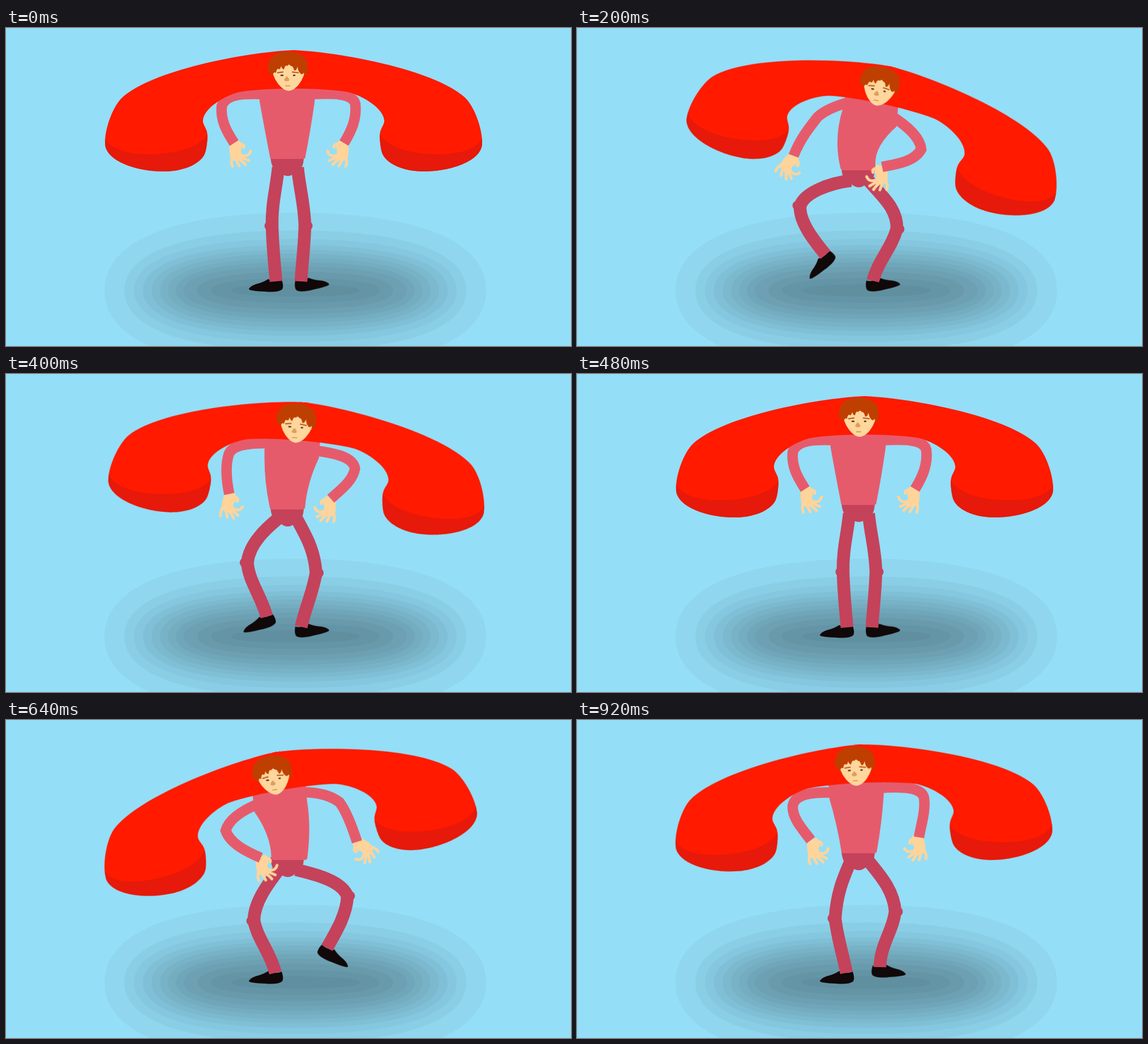
These frames come from a looping animation (998 by 561 pixels, 960 ms). An HTML page without scripts:

```html
<!DOCTYPE html>
<html lang="en">
<head>
<meta charset="utf-8">
<title>Phone carrier dance</title>
<style>
html, body { margin: 0; width: 100%; height: 100%; overflow: hidden; background: #94def7; }
svg { display: block; width: 998px; height: 561px; }

/* --r: rest, --a: sway to the right, --b: sway to the left */
.sway { animation: sway .96s steps(6) infinite; }
.lean { d: var(--r); animation: lean .96s steps(6) infinite; }
.limb { d: var(--r); animation: bend .96s infinite; fill: none; }
.leg  { stroke: #c5425b; stroke-width: 22.5; }
.arm  { stroke: #e65b6c; stroke-width: 18.5; }

@keyframes sway {
  0%, 50%, 100% { transform: none; }
  25% { transform: var(--a); }
  75% { transform: var(--b); }
}
@keyframes lean {
  0%, 50%, 100% { d: var(--r); }
  25% { d: var(--a); }
  75% { d: var(--b); }
}
/* Knees and elbows bend unevenly, so limbs get two poses on the way to the peak */
@keyframes bend {
  0%      { d: var(--r);  animation-timing-function: steps(1); }
  4.166%  { d: var(--a1); animation-timing-function: steps(3); }
  16.66%  { d: var(--a2); animation-timing-function: steps(2); }
  25%     { d: var(--a);  animation-timing-function: steps(2); }
  33.33%  { d: var(--a2); animation-timing-function: steps(3); }
  45.83%  { d: var(--a1); animation-timing-function: steps(1); }
  50%     { d: var(--r);  animation-timing-function: steps(1); }
  54.166% { d: var(--b1); animation-timing-function: steps(3); }
  66.66%  { d: var(--b2); animation-timing-function: steps(2); }
  75%     { d: var(--b);  animation-timing-function: steps(2); }
  83.33%  { d: var(--b2); animation-timing-function: steps(3); }
  95.83%  { d: var(--b1); animation-timing-function: steps(1); }
  100%    { d: var(--r); }
}

#leg-left {
  marker-mid: url(#knee-left);
  --r:  path("M481 246C478 280 469 310 470 349C471 385 474 415 477 447");
  --a1: path("M480 250C466 270 441 300 439 338C442 372 464 396 468 438");
  --a2: path("M482 265C448 276 408 296 401 322C402 352 422 378 446 408");
  --a:  path("M486 273C444 272 396 284 387 306C384 332 410 366 432 392");
  --b1: path("M482 252C470 280 459 305 456 350C460 385 470 415 476 446");
  --b2: path("M482 264C462 290 438 322 438 354C444 386 466 408 476 446");
  --b:  path("M482 275C455 300 426 326 430 358C436 388 468 414 476 446");
}
#leg-right {
  marker-mid: url(#knee-right);
  --r:  path("M515 246C518 280 527 310 528 349C527 385 523 415 521 447");
  --a1: path("M514 252C526 280 537 305 541 350C537 385 527 415 521 446");
  --a2: path("M514 265C534 292 560 316 561 352C552 386 532 408 522 446");
  --a:  path("M514 271C542 300 572 320 569 356C560 390 532 412 523 446");
  --b1: path("M516 250C532 270 560 300 562 338C558 372 536 396 535 436");
  --b2: path("M512 264C546 272 594 284 603 311C602 342 584 372 567 402");
  --b:  path("M508 269C560 268 608 264 617 288C621 318 604 354 588 382");
}
#arm-left {
  --r:  path("M460 117C420 115 388 116 381 138C379 162 388 180 403 203");
  --a1: path("M462 120C424 117 388 118 384 138C381 160 389 184 398 207");
  --a2: path("M478 126C448 130 426 136 413 147C398 166 390 194 387 221");
  --a:  path("M483 136C460 146 446 158 437 167C422 186 398 198 378 230");
  --b1: path("M460 128C416 127 384 130 381 152C380 172 396 190 413 212");
  --b2: path("M450 146C420 158 394 174 388 195C396 218 424 232 450 243");
  --b:  path("M444 158C418 180 398 206 400 229C416 250 448 256 472 261");
}
#arm-right {
  --r:  path("M534 117C576 115 612 114 617 134C620 160 610 182 597 203");
  --a1: path("M534 127C580 127 614 130 617 152C616 172 602 190 586 212");
  --a2: path("M548 149C580 162 612 178 615 197C606 220 574 230 549 236");
  --a:  path("M554 156C580 178 600 206 601 231C586 252 554 250 529 254");
  --b1: path("M534 120C572 117 610 118 613 138C616 160 608 184 604 207");
  --b2: path("M522 127C556 128 574 134 589 145C602 162 612 190 620 215");
  --b:  path("M514 132C536 150 554 160 565 169C582 186 608 198 634 217");
}
#torso {
  fill: #e65b6c;
  --r: path("M447 100L448 130Q457 180 466 226Q466 231 470 231L525 231Q529 231 529 226Q538 180 545 131L547 100Z");
  --a: path("M482 114L474 144Q452 198 465 250Q466 255 470 255L521 255Q527 255 527 250Q520 216 568 183L572 138Z");
  --b: path("M429 136L434 178Q473 214 470 250Q471 255 475 255L529 255Q534 255 534 250Q540 192 525 147L519 112Z");
}
#pelvis { --a: translate(0, 24px); --b: translate(0, 24px); }
#phone {
  transform-origin: 508px 163px;
  --a: translate(24px, 31px) rotate(14.8deg);
  --b: translate(-17px, 23.5px) rotate(-15deg);
}
#head {
  transform-origin: 499px 110px;
  --a: translate(35px, 31px) rotate(13.8deg);
  --b: translate(-32px, 31px) rotate(-13.8deg);
}
#foot-left  { transform-origin: 477px 446px; --a: translate(-46px, -55px) rotate(-48deg); --b: none; }
#foot-right { transform-origin: 521px 446px; --a: none; --b: translate(68px, -66px) rotate(52deg); }
#hand-left {
  transform-origin: 403px 203px;
  --a: translate(-25px, 27px) rotate(54deg);
  --b: translate(70px, 59px) rotate(0deg);
}
#hand-right {
  transform-origin: 597px 203px;
  --a: translate(-70px, 50px) rotate(-9deg);
  --b: translate(36px, 16px) rotate(-88deg);
}
</style>
</head>
<body>
<svg viewBox="0 0 998 561">
  <defs>
    <path id="ring" d="M-1 0C-1-.64-.64-1 0-1S1-.64 1 0 .64 1 0 1-1 .64-1 0"/>
    <path id="shoe" fill="#100809" d="M-14-3Q-3 3 10-2Q14 9 11 15Q3 21-19 19Q-45 18-48 15Q-47 10-36 6Q-23 3-14-3Z"/>
    <g id="hand" stroke="#ffd49b" stroke-width="5" stroke-linecap="round" fill="none">
      <path fill="#ffd49b" stroke="none" d="M-8 3L8-5Q17 2 12 15Q16 24 10 30L-4 31Q-10 18-8 3Z"/>
      <path d="M9 1Q19 2 17 8M10 21Q26 26 29 14M8 24Q20 28 26 31M6 27Q14 31 20 38M2 27Q6 35 9 40M-4 26Q-6 36-3 41"/>
    </g>
    <g id="half-phone">
      <path fill="#ff1a00" d="M509 39H508C420 43 257 75 205 123C189 138 174 178 175 204C176 236 235 254 282 253C318 252 344 238 351 222C355 208 358 190 354 180C350 171 347 167 348 162C350 142 384 120 412 113C440 108 480 107 508 107H509Z"/>
      <path fill="#e6190a" d="M175 194C186 222 245 227 290 220C322 215 345 205 355.500 188C356 205 353 218 351 222C344 238 318 252 282 253C235 254 176 236 175 204Z"/>
    </g>
    <marker id="knee-left" orient="auto" markerUnits="userSpaceOnUse" overflow="visible">
      <circle cy="5" r="8.500" fill="#c5425b"/>
    </marker>
    <marker id="knee-right" orient="auto" markerUnits="userSpaceOnUse" overflow="visible">
      <circle cy="-5" r="8.500" fill="#c5425b"/>
    </marker>
  </defs>

  <rect width="998" height="561" fill="#94def7"/>
  <g transform="translate(511 463)" fill-opacity=".034">
    <use href="#ring" transform="scale(337 137)"/>
    <use href="#ring" transform="scale(302 106)"/>
    <use href="#ring" transform="scale(285 91)"/>
    <use href="#ring" transform="scale(269 80)"/>
    <use href="#ring" transform="scale(254 72)"/>
    <use href="#ring" transform="scale(239 65)"/>
    <use href="#ring" transform="scale(225 57)"/>
    <use href="#ring" transform="scale(211 50)"/>
    <use href="#ring" transform="scale(197 42)"/>
    <use href="#ring" transform="scale(173 33)"/>
    <use href="#ring" transform="scale(149 22)"/>
    <use href="#ring" transform="scale(114 11)"/>
  </g>

  <g id="foot-left" class="sway"><use href="#shoe" transform="translate(477 446)"/></g>
  <g id="foot-right" class="sway"><use href="#shoe" transform="translate(521 446) rotate(-10) scale(-1 1)"/></g>
  <path id="leg-left" class="limb leg"/>
  <path id="leg-right" class="limb leg"/>
  <path id="pelvis" class="sway" fill="#c5425b" d="M467 226H526Q526 240 522 246Q514 248 510 256Q498 266 485 256Q480 248 472 246Q468 240 467 226Z"/>
  <path id="torso" class="lean"/>

  <g id="hand-left" class="sway"><use href="#hand" transform="translate(403 203)"/></g>
  <g id="hand-right" class="sway"><use href="#hand" transform="translate(597 203) scale(-1 1)"/></g>
  <path id="arm-left" class="limb arm"/>
  <path id="arm-right" class="limb arm"/>

  <g id="phone" class="sway">
    <use href="#half-phone"/>
    <use href="#half-phone" transform="translate(1016 0) scale(-1 1)"/>
  </g>
  <g id="head" class="sway">
    <path fill="#ffd69c" d="M470 66Q469 84 481 99Q490 110 499 111Q509 110 517 100Q529 84 529 66Q500 50 470 66Z"/>
    <path fill="#bf3f00" d="M463 72C460 66 464 62 465 60C466 48 482 41 498 42C516 42 531 50 532 62Q534 72 531 85Q527 85 526 79Q522 84 519 79Q516 76 515 68Q513 76 509 75Q507 66 503 67Q500 62 497 67Q493 64 491 73Q487 72 486 67Q484 75 481 72Q478 71 477 79Q473 77 472 81Q467 85 466 78Q462 77 463 72Z"/>
    <path stroke="#c2521a" stroke-width="2" fill="none" d="M479 79L490 77.500M505 77.500L517 79"/>
    <path stroke="#2a1408" stroke-width="2" fill="none" d="M485 83.500H490M507 83.500H511"/>
    <path fill="#dd9e5f" d="M496 85Q502 91 500 93Q496 95 492 93Q490 91 496 85Z"/>
    <path stroke="#e08a48" stroke-width="1.500" fill="none" d="M493 102H502"/>
  </g>
</svg>
</body>
</html>
```
